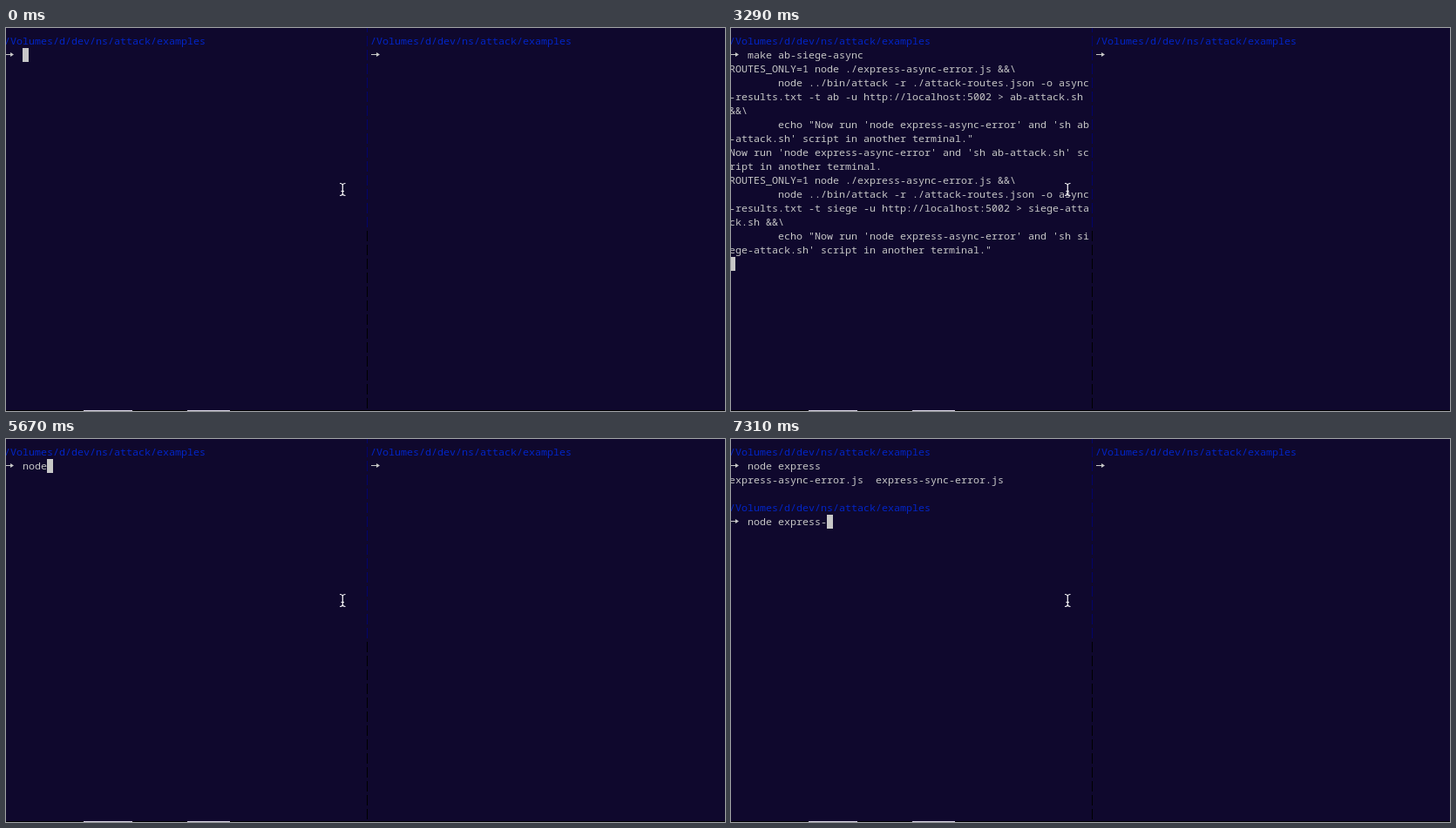
Write an HTML page with a canvas that moves like this. It is 825 by 440 pixels and loops after 8 s.

```html
<!DOCTYPE html>
<html lang="en">
<head>
<meta charset="utf-8">
<title>Terminal session</title>
<style>
  html, body { margin: 0; width: 100%; height: 100%; overflow: hidden; background: #0f082d; }
  canvas { display: block; }
</style>
</head>
<body>
<canvas id="stage" width="825" height="440"></canvas>
<script>
const ctx = document.getElementById('stage').getContext('2d');

const LOOP = 8000;
const CELL = 7, ROW = 16, LEFT = -2, RIGHT = 418, TOP = 7, COLS = 59;
const BG = '#0f082d', TEXT = '#c7c7c7', BLUE = '#0225c7';

const PATH = '/Volumes/d/dev/ns/attack/examples';
const PROMPT = '>  ';
const COMMAND = 'make ab-siege-async';
const TYPED = 'node express';
const KEY_TIMES = [[5230, 1], [5370, 3], [5670, 4], [5820, 5], [6270, 6], [6420, 7],
  [6560, 8], [6710, 9], [6860, 10], [7010, 11], [7160, 12]];

const wrap = line => line.match(new RegExp(`.{1,${COLS}}`, 'g')) || [''];

function recipe(tool) {
  const message = `Now run 'node express-async-error' and 'sh ${tool}-attack.sh' script in another terminal.`;
  return {
    commands: [
      'ROUTES_ONLY=1 node ./express-async-error.js &&\\',
      `        node ../bin/attack -r ./attack-routes.json -o async-results.txt -t ${tool} -u http://localhost:5002 > ${tool}-attack.sh &&\\`,
      `        echo "${message}"`
    ].flatMap(wrap),
    result: wrap(message)
  };
}

const ab = recipe('ab');
const siege = recipe('siege');
const abRun = [PATH, PROMPT + COMMAND, ...ab.commands];
const siegeRun = [...abRun, ...ab.result, ...siege.commands];
const finished = [...siegeRun, ...siege.result, '', PATH, PROMPT];
const completed = [PATH, PROMPT + TYPED, 'express-async-error.js  express-sync-error.js',
  '', PATH, PROMPT + TYPED + '-'];

// Lines of the left pane and the cursor cell; the cursor defaults to the end of the text.
function screenAt(t) {
  const atEnd = lines => ({ lines, row: lines.length - 1, col: lines[lines.length - 1].length });
  const below = lines => ({ lines, row: lines.length, col: 0 });
  if (t < 1200) return atEnd([PATH, PROMPT]);
  if (t < 2850) return { lines: [PATH, PROMPT + COMMAND], row: 1, col: PROMPT.length };
  if (t < 3290) return below(abRun);
  if (t < 3740) return below(siegeRun);
  if (t < 4630) return atEnd(finished);
  if (t >= 7310) return atEnd(completed);
  const count = KEY_TIMES.reduce((n, [time, keys]) => t >= time ? keys : n, 0);
  return atEnd([PATH, PROMPT + TYPED.slice(0, count)]);
}

function drawArrow(x, y) {
  ctx.fillRect(x + 1, y + 7, 6, 1);
  ctx.beginPath();
  ctx.moveTo(x + 7, y + 5);
  ctx.lineTo(x + 11, y + 7.5);
  ctx.lineTo(x + 7, y + 10);
  ctx.fill();
}

function drawChar(char, x, y, color) {
  ctx.fillStyle = color;
  ctx.fillText(char, x, y + 12);
}

function drawLine(line, left, row) {
  const y = TOP + row * ROW;
  const color = line === PATH ? BLUE : TEXT;
  const isPrompt = line.startsWith(PROMPT);
  [...line].forEach((char, i) => {
    if (char === ' ' || (isPrompt && i === 0)) return;
    drawChar(char, left + i * CELL, y, color);
  });
  if (isPrompt) {
    ctx.fillStyle = TEXT;
    drawArrow(left, y);
  }
}

function drawCursor({ lines, row, col }) {
  const x = LEFT + col * CELL, y = TOP + row * ROW;
  ctx.fillStyle = TEXT;
  ctx.fillRect(x, y, CELL, ROW);
  const char = (lines[row] || '')[col];
  if (char) drawChar(char, x, y, BG);
}

function drawFrame() {
  for (let row = -1; row < 27; row++) {
    ctx.fillStyle = row < 14 ? '#02036a' : '#000';
    ctx.fillRect(414, TOP + row * ROW + 2, 1, 12);
  }
  ctx.fillStyle = '#000';
  ctx.fillRect(0, 439, 825, 1);
  ctx.fillStyle = '#d5d0e0';
  ctx.fillRect(89, 439, 56, 1);
  ctx.fillRect(208, 439, 49, 1);
}

function drawPointer() {
  ctx.strokeStyle = '#fff';
  ctx.lineWidth = 1.2;
  ctx.beginPath();
  ctx.moveTo(383, 178.5);
  ctx.quadraticCurveTo(386, 178.5, 386.3, 180.5);
  ctx.quadraticCurveTo(386.6, 178.5, 389.5, 178.5);
  ctx.moveTo(386.3, 180);
  ctx.lineTo(386.3, 191);
  ctx.moveTo(383, 192.5);
  ctx.quadraticCurveTo(386, 192.5, 386.3, 190.5);
  ctx.quadraticCurveTo(386.6, 192.5, 389.5, 192.5);
  ctx.moveTo(384.5, 187.5);
  ctx.lineTo(388, 187.5);
  ctx.stroke();
}

function render(t) {
  ctx.fillStyle = BG;
  ctx.fillRect(0, 0, 825, 440);
  ctx.font = '11.667px "Noto Sans Mono", "DejaVu Sans Mono", monospace';
  drawFrame();
  const screen = screenAt(t);
  screen.lines.forEach((line, row) => drawLine(line, LEFT, row));
  [PATH, PROMPT].forEach((line, row) => drawLine(line, RIGHT, row));
  drawCursor(screen);
  drawPointer();
}

const start = performance.now();
function tick() {
  render((performance.now() - start) % LOOP);
  requestAnimationFrame(tick);
}
tick();
</script>
</body>
</html>
```
